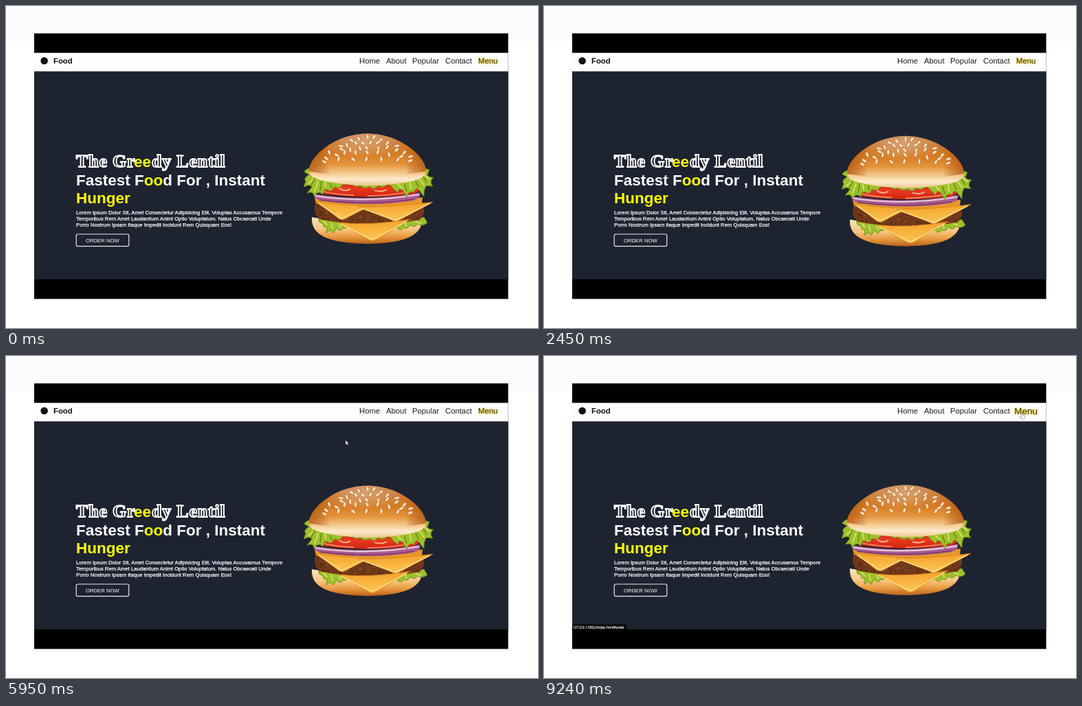
Animation of 774x470 px, one loop 9.31 s. Source, as an HTML page:

```html
<!DOCTYPE html>
<html lang="en">
<head>
<meta charset="utf-8">
<title>Food landing page</title>
<style>
  html, body { margin: 0; width: 100%; height: 100%; overflow: hidden; background: #fff; }
  svg { display: block; width: 774px; height: 470px; font-family: "Liberation Sans", Arial, sans-serif; }
  .nav { font-size: 11.3px; fill: #1d1d1f; }
  .glow { fill: #3a3410; filter: drop-shadow(0 0 1px #f0cc10) drop-shadow(0 0 1px #f0cc1090); }
  .title { font-size: 22.5px; font-weight: bold; fill: #fff; }
  .ornate { font: bold 26px "Liberation Serif", Times, serif; letter-spacing: .8px; fill: #1e2330; stroke: #fff; stroke-width: 1.9px; }
  .hot { fill: #ff0; }
  .copy { font-size: 7.7px; fill: #fff; stroke: #fff; stroke-width: .25px; }
  #status text { font: 4.9px "Open Sans", sans-serif; fill: #fff; stroke: #fff; stroke-width: .15px; }
  .leaf { fill: #9fc02a; stroke: #5f8a1a; stroke-width: .8; stroke-linejoin: round; }
  .vein { fill: none; stroke: #d9e67c; stroke-width: 1.6; stroke-linecap: round; }
  .shade { fill: none; stroke: #557c14; stroke-width: 1.2; stroke-linecap: round; }
  .cheese { fill: url(#cheese); stroke: #d9841c; stroke-width: .8; stroke-linejoin: round; }
  .rim { fill: none; stroke: #ffe08c; stroke-width: 1.3; }
</style>
</head>
<body>
<svg viewBox="0 0 774 470">
  <defs>
    <linearGradient id="crown" x2="0" y2="1">
      <stop offset="0" stop-color="#c78449"/><stop offset=".2" stop-color="#c9752c"/>
      <stop offset=".42" stop-color="#d87c20"/><stop offset=".6" stop-color="#e4963f"/>
      <stop offset=".74" stop-color="#f2c384"/><stop offset=".88" stop-color="#fdeacb"/>
      <stop offset="1" stop-color="#eec78d"/>
    </linearGradient>
    <radialGradient id="shine" cx=".47" cy=".2" r=".36">
      <stop offset="0" stop-color="#f0cdb0" stop-opacity=".5"/><stop offset="1" stop-color="#f0cdb0" stop-opacity="0"/>
    </radialGradient>
    <linearGradient id="edge">
      <stop offset="0" stop-color="#b2560f" stop-opacity=".55"/><stop offset=".18" stop-color="#b2560f" stop-opacity="0"/>
      <stop offset=".82" stop-color="#b2560f" stop-opacity="0"/><stop offset="1" stop-color="#b2560f" stop-opacity=".55"/>
    </linearGradient>
    <linearGradient id="heel" x2="0" y2="1">
      <stop offset="0" stop-color="#fbe3b8"/><stop offset=".45" stop-color="#f6c680"/>
      <stop offset=".75" stop-color="#e6973c"/><stop offset="1" stop-color="#b9621a"/>
    </linearGradient>
    <linearGradient id="cheese" x2="0" y2="1">
      <stop offset="0" stop-color="#f3a22a"/><stop offset="1" stop-color="#ffc656"/>
    </linearGradient>
    <linearGradient id="tomato" x2="0" y2="1">
      <stop offset="0" stop-color="#a81c10"/><stop offset=".4" stop-color="#ea3a22"/><stop offset="1" stop-color="#d2250f"/>
    </linearGradient>
    <clipPath id="pattyShape"><path id="pattyPath" d="M451 287Q445 300 456 311Q526 325 602 312Q613 300 605 286Z"/></clipPath>
  </defs>

  <rect width="774" height="53" fill="#fcfcfe"/>
  <rect x="41" y="40" width="689.6" height="387.6"/>
  <rect x="41" y="68.4" width="689.6" height="28" fill="#fdfdfd"/>
  <rect x="41" y="95.4" width="689.6" height="303.6" fill="#1e2330"/>

  <circle cx="55.7" cy="80" r="5.3" fill="#111"/>
  <text x="69" y="84" font-size="11.3" font-weight="bold" fill="#111">Food</text>
  <g id="nav"></g>

  <text class="ornate" x="102" y="235">The Gr</text>
  <text class="title hot" x="186" y="235">ee</text>
  <text class="ornate" x="212" y="235">dy Lentil</text>
  <text class="title" x="102" y="262">Fastest F<tspan class="hot">oo</tspan>d For , Instant</text>
  <text class="title hot" x="102" y="288">Hunger</text>
  <g class="copy">
    <text x="102" y="303.5">Lorem Ipsum Dolor Sit, Amet Consectetur Adipisicing Elit. Voluptas Accusamus Tempore</text>
    <text x="102" y="312.5">Temporibus Rem Amet Laudantium Animi Optio Voluptatum. Natus Obcaecati Unde</text>
    <text x="102" y="321.5">Porro Nostrum Ipsam Itaque Impedit Incidunt Rem Quisquam Eos!</text>
  </g>
  <rect x="102.2" y="333" width="76.6" height="17.7" rx="2.5" fill="none" stroke="#e8e8ea" stroke-width="1.2"/>
  <text x="116" y="344.6" font-size="7.7" fill="#fff">ORDER NOW</text>

  <g id="burger">
    <path d="M445 308C444 328 456 346 526 347C594 346 606 328 606 308Q526 322 445 308Z" fill="url(#heel)"/>
    <path class="leaf" d="M455 310Q454 317 461 317Q461 325 467 322L466 331Q473 324 476 331L481 324Q487 331 489 324Q497 326 496 319L512 316Z"/>
    <path class="vein" d="M462 314L467 319M473 317L475 325M484 318L487 323"/>
    <path class="leaf" d="M552 316Q553 323 560 320Q562 328 568 322Q573 331 579 323Q584 327 588 319Q594 325 599 318Q607 322 613 316L608 308Z"/>
    <path class="vein" d="M566 317L570 321M581 316L582 321M596 314L603 317"/>
    <use href="#pattyPath" fill="#713819"/>
    <g id="crumbs" clip-path="url(#pattyShape)"></g>
    <path class="cheese" d="M484 316Q530 321 588 311L538 341Q533 344 528 341Z"/>
    <path class="rim" d="M487 318L529 339Q533 341 537 339L583 314"/>

    <path d="M449 279Q526 293 606 279L605 289Q526 299 451 288Z" fill="#e9962a"/>
    <path class="cheese" d="M451 285Q482 290 529 292L492 311Q488 313 484 310Z"/>
    <path class="rim" d="M455 288L485 308Q488 310 491 309L523 293"/>
    <path class="cheese" d="M512 293Q562 294 621 286L571 313Q566 316 561 312Z"/>
    <path class="rim" d="M517 295L562 311Q566 313 570 311L617 288"/>

    <path d="M448 274Q526 287 602 272Q605 281 592 284Q526 294 458 284Q447 281 448 274Z" fill="#a85a8f"/>
    <path d="M450 277Q526 288 601 275" fill="none" stroke="#e6c5d6" stroke-width="2.4"/>
    <path d="M456 283Q526 292 593 282" fill="none" stroke="#713268" stroke-width="1.2"/>
    <path d="M455 256Q526 263 600 255Q609 269 593 274Q526 283 461 274Q447 268 455 256Z" fill="url(#tomato)"/>
    <path d="M459 270Q480 275 506 276M526 277Q566 276 590 270" fill="none" stroke="#f98b6c" stroke-width="1.6"/>
    <path d="M484 265Q492 272 501 267M536 269Q547 272 554 268" fill="none" stroke="#f6b189" stroke-width="2"/>

    <path class="leaf" d="M443 236Q435 238 434 242L441 246Q432 251 436 256L433 264Q442 259 445 264L438 273Q448 269 448 278Q454 268 461 275Q462 266 468 268Q474 273 477 264Q486 267 489 261L499 258Z"/>
    <path class="vein" d="M443 242L447 250M447 253L440 259M454 256L449 270M464 257L465 264"/>
    <path class="shade" d="M450 249L444 262M459 256L457 269M472 258L473 265"/>
    <path class="leaf" d="M503 259Q509 266 515 262Q523 268 529 263Q536 270 541 262Q549 267 555 260L576 256Z"/>
    <path class="leaf" d="M552 260Q559 259 563 266L570 272Q572 263 578 270L583 279Q586 268 593 272Q598 262 602 270L608 278Q608 265 612 262L621 263Q615 256 622 250Q614 250 613 246L616 239Q606 235 603 241Q590 255 552 260Z"/>
    <path class="vein" d="M570 260L576 266M588 257L589 267M601 251L608 261M609 247L616 252"/>
    <path class="shade" d="M580 260L583 270M596 255L600 264M606 247L612 257"/>

    <path d="M441 241C441 219 479 186 526 186C573 186 611 219 611 241C611 252 592 256 576 258Q526 266 478 258C454 254 441 250 441 241Z" fill="url(#crown)"/>
    <path id="top" d="M441 241C441 219 479 186 526 186C573 186 611 219 611 241Q526 256 441 241Z" fill="url(#edge)"/>
    <use href="#top" style="fill:none"/>
    <path d="M441 241C441 219 479 186 526 186C573 186 611 219 611 241Q526 262 441 241Z" fill="url(#shine)"/>
    <g id="seeds" fill="#fae3c4" stroke="#a9622a" stroke-width=".6"></g>
  </g>

  <g id="status"><rect x="41" y="391.5" height="7.5" fill="#07090d"/><text x="42" y="397.6"></text></g>
  <path id="arrow" d="M0 0V6.2L1.5 5L2.6 7.3L3.7 6.7L2.6 4.6H4.4Z" fill="#fff" stroke="#333" stroke-width=".3"/>
  <path id="hand" d="M-.8 .5Q0 -.7 .8 .5V3L3.7 4V6.5L2.7 8.8H-1.5L-3.4 5.3L-2.5 4.5L-.8 5.8Z" fill="#fff" stroke="#777" stroke-width=".6"/>
</svg>

<script>
const LOOP = 9310, STEP = 70;
const BOB = { period: 3150, peak: 990, middle: -2.2, swing: 6 };
const $ = id => document.getElementById(id);

function add(parent, tag, attrs, text = "") {
  const el = document.createElementNS("http://www.w3.org/2000/svg", tag);
  for (const key in attrs) el.setAttribute(key, attrs[key]);
  el.textContent = text;
  return parent.appendChild(el);
}

let seed = 11;
const random = () => (seed = seed * 16807 % 2147483647) / 2147483647;

const links = [["Home", 514, 30, "home"], ["About", 553, 29.5, "about"], ["Popular", 591, 39, "popular"],
  ["Contact", 639, 39, "contact"], ["Menu", 687, 28.3, "order"]].map(([label, x, width, hash]) => {
  const cls = label === "Menu" ? "nav glow" : "nav";
  return { x, width, hash, el: add($("nav"), "text", { x, y: 84, class: cls }, label) };
});

// Sesame rows curve around the dome: [count, half width]
[[5, 26], [8, 46], [9, 60], [9, 70], [7, 74]].forEach(([count, half], row) => {
  for (let i = 0; i < count; i++) {
    const u = (i + .5) / count * 2 - 1;
    const x = 526 + u * half + (random() - .5) * 5;
    const y = 191 + row * 7.6 + u * u * 8 + (random() - .5) * 4;
    add($("seeds"), "ellipse", { rx: 2, ry: 4,
      transform: `translate(${x} ${y}) rotate(${u * 50 + (random() - .5) * 90})` });
  }
});

for (let i = 0; i < 260; i++) {
  add($("crumbs"), "circle", { cx: 446 + random() * 164, cy: 286 + random() * 34, r: .4 + random() * .9,
    fill: ["#4a2010", "#94532c", "#5c2a12"][i % 3] });
}

// Pointer waypoints: [time, x, y]
const route = [[5600, 478, 165], [5950, 494, 123], [6440, 527, 87], [7280, 535, 82], [7700, 568, 84],
  [8100, 610, 85], [8600, 658, 85], [9100, 693, 84], [9310, 697, 83]];

function pointerAt(t) {
  const i = route.findIndex(point => point[0] > t);
  if (i < 1) return null;
  const [t0, x0, y0] = route[i - 1], [t1, x1, y1] = route[i];
  const p = (t - t0) / (t1 - t0), e = p * p * (3 - 2 * p);
  return { x: x0 + (x1 - x0) * e, y: y0 + (y1 - y0) * e };
}

const isOver = (link, p) => p && p.y < 95 && p.x > link.x - 2 && p.x < link.x + link.width + 2;

function scaleAt(link, t) {
  let scale = 1;
  for (let s = route[0][0]; s <= t; s += STEP)
    scale = isOver(link, pointerAt(s)) ? Math.min(1.2, scale + .04) : Math.max(1, scale - .04);
  return scale;
}

function place(el, point, visible) {
  el.style.display = visible ? "" : "none";
  if (visible) el.setAttribute("transform", `translate(${point.x} ${point.y})`);
}

function draw(t) {
  const angle = (t - BOB.peak) / BOB.period * 2 * Math.PI;
  $("burger").setAttribute("transform", `translate(0 ${BOB.middle - BOB.swing * Math.cos(angle)})`);

  const pointer = pointerAt(t);
  place($("arrow"), pointer, pointer && pointer.y >= 95);
  place($("hand"), pointer, pointer && pointer.y < 95);

  for (const link of links) {
    const cx = link.x + link.width / 2;
    link.el.setAttribute("transform", `translate(${cx} 80.5) scale(${scaleAt(link, t)}) translate(${-cx} -80.5)`);
  }

  const active = links.find(link => isOver(link, pointer));
  const status = $("status");
  status.style.display = active ? "" : "none";
  if (active) {
    const [box, label] = status.children;
    label.textContent = "127.0.0.1:5502/index.html#" + active.hash;
    box.setAttribute("width", label.getComputedTextLength() + 4);
  }
}

const start = performance.now();
function tick() {
  const elapsed = (performance.now() - start) % LOOP;
  draw(Math.floor(elapsed / STEP) * STEP);
  requestAnimationFrame(tick);
}
tick();
</script>
</body>
</html>
```
